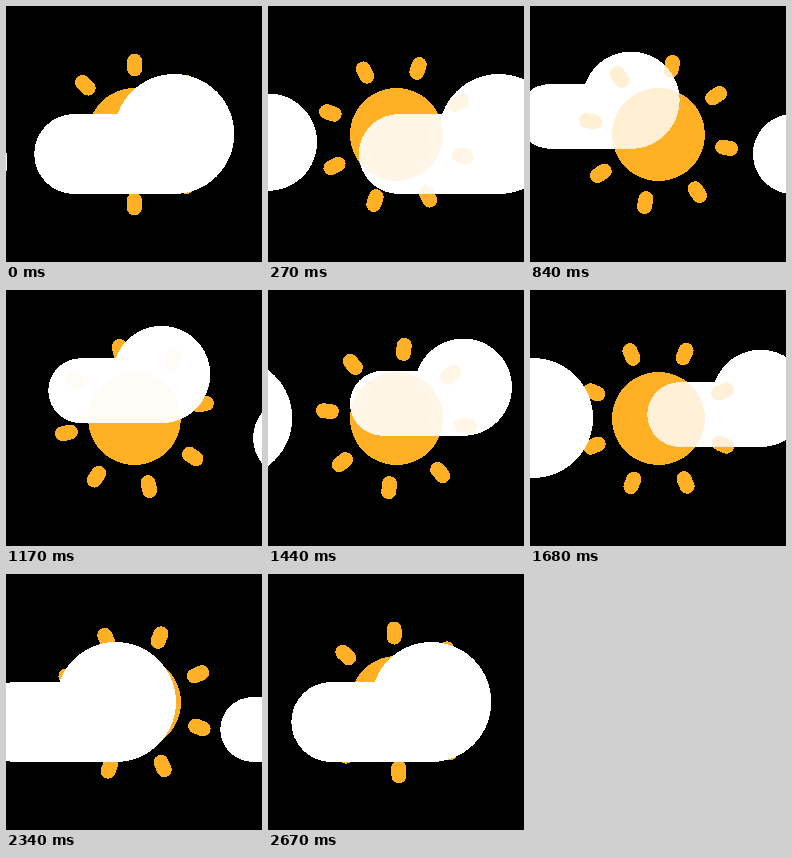
An HTML page for the animation above (2700 ms loop, 256 px wide and 256 px high).

```html
<!DOCTYPE html>
<html lang="en">
<head>
<meta charset="utf-8">
<title>Sun and clouds</title>
<style>
  html, body { margin: 0; height: 100%; overflow: hidden; background: #000; }
  svg { display: block; width: 100vw; height: 100vh; }
</style>
</head>
<body>
<svg viewBox="0 0 256 256" shape-rendering="crispEdges">
  <defs>
    <g id="cloud" fill="#fff">
      <rect y="40" width="180" height="80" rx="40"/>
      <circle cx="140" cy="60" r="60"/>
    </g>
    <path id="rays" d="M0-73.5V-65.5M0 73.5V65.5M-73.5 0H-65.5M73.5 0H65.5"/>
  </defs>
  <!-- Solid clouds behind the sun keep the veils in front pure white elsewhere. -->
  <use href="#cloud" class="small"/>
  <use href="#cloud" class="big"/>
  <g id="sun" fill="#ffb024" stroke="#ffb024" stroke-linecap="round">
    <circle r="46.5" stroke="none"/>
    <g stroke-width="15">
      <use href="#rays"/>
      <use href="#rays" transform="rotate(45)"/>
    </g>
  </g>
  <use href="#cloud" class="small veil"/>
  <use href="#cloud" class="big veil"/>
</svg>
<script>
const LOOP = 2700;
const sun = document.getElementById('sun');

// Keys are [time, ...values]; values change linearly between them.
const smallKeys = [[0, -160.8, 107.5, 0], [1050, 24.5, 30.2, 1], [LOOP, 267, 107.5, .55]];
const bigKeys = [[0, 28, 68, 1], [945, 247, 68, .65], [1350, 247, 68, .65], [1350, -190.5, 68, 1], [LOOP, 28, 68, 1]];

function sample(keys, t) {
  const i = keys.findIndex(key => key[0] > t);
  const [a, b] = [keys[i - 1], keys[i]];
  const k = (t - a[0]) / (b[0] - a[0]);
  return a.slice(1).map((v, j) => v + (b[j + 1] - v) * k);
}

function place(name, keys, scale, t) {
  const [x, y, opacity] = sample(keys, t);
  for (const cloud of document.querySelectorAll('.' + name)) {
    cloud.setAttribute('transform', `translate(${x} ${y}) scale(${scale})`);
    if (cloud.classList.contains('veil')) cloud.setAttribute('opacity', opacity);
  }
}

function draw() {
  const t = performance.now() % LOOP;
  sun.setAttribute('transform', `translate(128.5 128.5) rotate(${180 * t / LOOP})`);
  place('small', smallKeys, .81, t);
  place('big', bigKeys, 1, t);
  requestAnimationFrame(draw);
}
draw();
</script>
</body>
</html>
```
